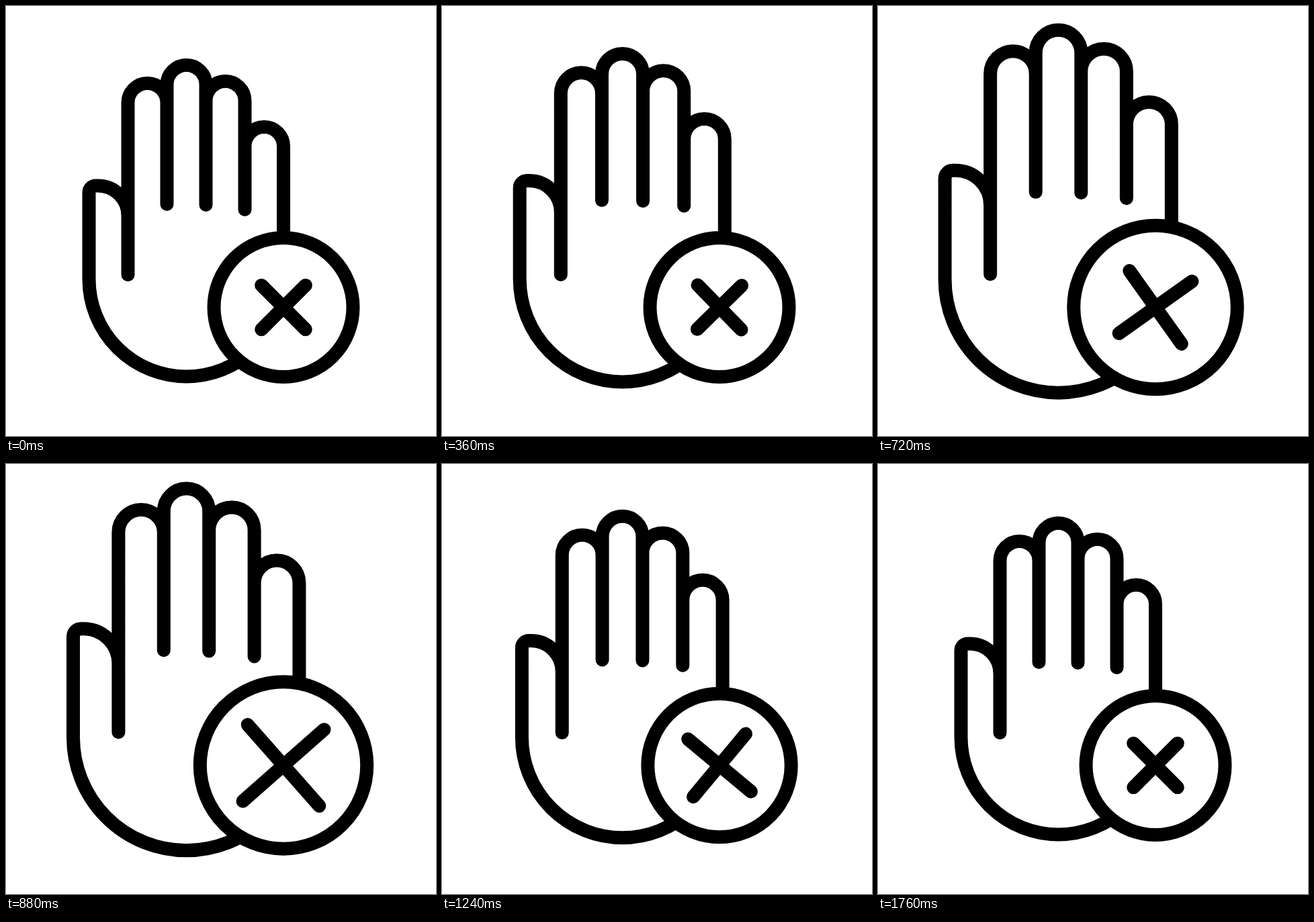
Recreate the animation shown at these times as an HTML page with a canvas. Size 640 by 640 pixels, loop 1.88 s.

```html
<!DOCTYPE html>
<html lang="en">
<head>
<meta charset="utf-8">
<title>Raised hand with cross badge</title>
<style>
  html, body { margin: 0; width: 100%; height: 100%; overflow: hidden; background: #fff; }
  canvas { display: block; width: 100vw; height: 100vh; }
</style>
</head>
<body>
<canvas id="stage" width="640" height="640"></canvas>
<script>
const ctx = document.getElementById('stage').getContext('2d');
const LOOP = 1880, STEP = 40, REST = 120;
const PALM = { x: 268.5, y: 405 };
const BADGE = { x: 413, y: 448.5 };

// Ease-in-out: cubic Bezier (.42, 0, .58, 1)
function ease(x) {
  if (x <= 0) return 0;
  if (x >= 1) return 1;
  let lo = 0, hi = 1, u = 0.5;
  for (let i = 0; i < 24; i++) {
    u = (lo + hi) / 2;
    const v = 1 - u;
    const bx = 1.26 * u * v * v + 1.74 * u * u * v + u * u * u;
    if (bx < x) lo = u; else hi = u;
  }
  return u * u * (3 - 2 * u);
}

// Keys are [time, value] pairs joined by eased segments
function track(t, keys) {
  let value = keys[0][1];
  for (let i = 1; i < keys.length; i++) {
    const [t0, v0] = keys[i - 1], [t1, v1] = keys[i];
    if (t >= t0) value = v0 + (v1 - v0) * ease((t - t0) / (t1 - t0));
  }
  return value;
}

const handScale = t => track(t, [[122, 1], [722, 1.165], [823, 1.165], [1423, 1]]);
const ringRadius = t => track(t, [[408, 103.5], [818, 124.2], [942, 124.2], [1352, 103.5]]);
const crossReach = t => track(t, [[465, 46.4], [930, 81.4], [985, 81.4], [1450, 46.4]]);
const crossTurn = t => track(t, [[300, 0], [660, 10], [1150, -5.5], [1710, 0]]);

function finger(left, right, top, end) {
  const r = (right - left) / 2;
  ctx.arc(left + r, top + r, r, Math.PI, 0);
  ctx.lineTo(right, end);
}

// The path is scaled, the line weight is not
function drawHand(scale) {
  ctx.save();
  ctx.translate(PALM.x, PALM.y);
  ctx.scale(scale, scale);
  ctx.translate(-PALM.x, -PALM.y);
  ctx.beginPath();
  ctx.moveTo(181.5, 400);
  finger(181.5, 239.5, 115, 295);
  ctx.moveTo(239.5, 295);
  finger(239.5, 297.5, 88, 296);
  ctx.moveTo(297.5, 296);
  finger(297.5, 355.5, 112, 303);
  ctx.moveTo(355.5, 303);
  finger(355.5, 413, 180, 406.5);
  ctx.arc(268.5, 406.5, 145, 0, Math.PI);
  ctx.arc(133.5, 277.5, 10, Math.PI, Math.PI * 1.5);
  ctx.arc(137, 312, 44.5, -Math.PI / 2, 0);
  ctx.restore();
  ctx.stroke();
}

function drawBadge(radius, reach, turn) {
  ctx.beginPath();
  ctx.arc(BADGE.x, BADGE.y, radius, 0, Math.PI * 2);
  ctx.fill();
  ctx.stroke();

  ctx.beginPath();
  for (const base of [45, -45]) {
    const angle = (base + turn) * Math.PI / 180;
    const dx = reach * Math.cos(angle), dy = reach * Math.sin(angle);
    ctx.moveTo(BADGE.x - dx, BADGE.y - dy);
    ctx.lineTo(BADGE.x + dx, BADGE.y + dy);
  }
  ctx.stroke();
}

function draw(time) {
  const stepped = Math.floor((time % LOOP) / STEP) * STEP;
  const t = stepped < REST ? 0 : stepped;
  ctx.fillStyle = '#fff';
  ctx.fillRect(0, 0, 640, 640);
  ctx.strokeStyle = '#000';
  ctx.lineWidth = 20;
  ctx.lineCap = ctx.lineJoin = 'round';
  drawHand(handScale(t));
  drawBadge(ringRadius(t), crossReach(t), crossTurn(t));
}

let start;
function tick(now) {
  start ??= now;
  draw(now - start);
  requestAnimationFrame(tick);
}
draw(0);
requestAnimationFrame(tick);
</script>
</body>
</html>
```
